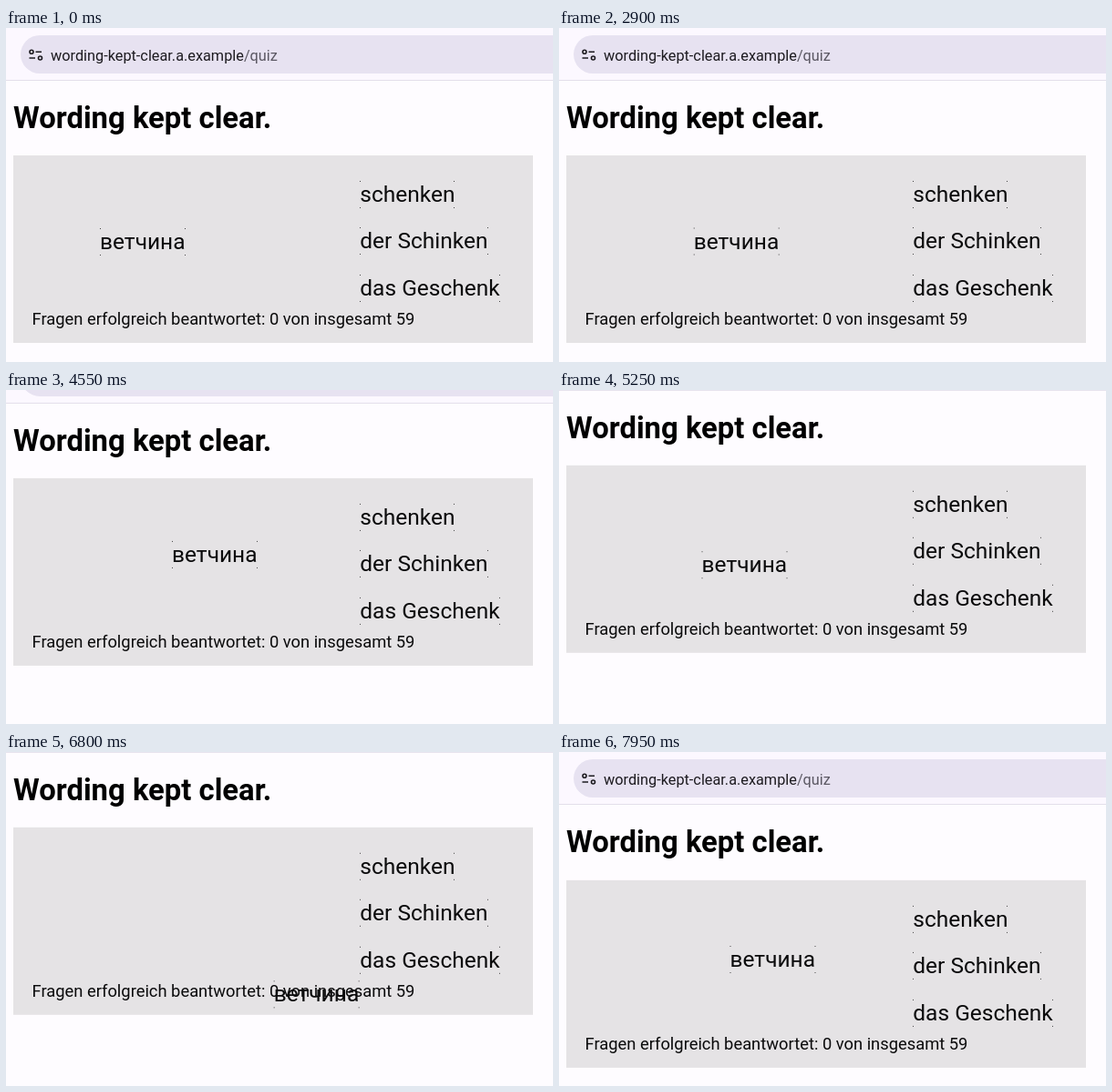
Write an HTML page that moves like this. It is 600 by 367 pixels and loops after 8000 ms.

```html
<!DOCTYPE html>
<html lang="de">
<head>
<meta charset="utf-8">
<title>Quiz</title>
<style>
  html, body { margin: 0; width: 100%; height: 100%; overflow: hidden; background: #fefcff; }
  body { position: relative; font-family: Roboto, "Noto Sans", sans-serif; color: #0b0b0c; }
  #page { position: absolute; left: 0; top: 0; width: 600px; height: 430px; }
  #page * { position: absolute; white-space: nowrap; margin: 0; }
  .bar { left: 0; top: 0; width: 600px; height: 57px; background: #fcf8ff; border-bottom: 1px solid #e3dfea; }
  .address { left: 16px; top: 8px; width: 620px; height: 42px; border-radius: 21px; background: #e7e2f1; }
  .bar svg { left: 24px; top: 22px; }
  .url { left: 49px; top: 20.5px; font-size: 16.3px; color: #1d1b20; }
  .url span { position: static !important; color: #5b5863; }
  h1 { left: 8px; top: 80px; font-size: 32.8px; font-weight: 700; color: #000; }
  #panel { left: 0; top: 0; }
  .back { left: 8px; top: 139.5px; width: 570px; height: 206.5px; background: #e5e3e5; }
  .status { left: 28.5px; top: 308.6px; font-size: 18.35px; }
  /* Each card has a single dark dot at every corner. */
  .card {
    left: 388.3px; top: calc(168px + var(--row) * 51.4px); font-size: 24.5px; padding-bottom: 1px;
    --dot: linear-gradient(#444, #444);
    background: var(--dot) 0 0, var(--dot) 100% 0, var(--dot) 0 100%, var(--dot) 100% 100%;
    background-size: 1px 1px; background-repeat: no-repeat;
  }
  #word { left: 103px; top: 219.5px; }
</style>
</head>
<body>
<div id="page">
  <div class="bar">
    <div class="address"></div>
    <svg width="18" height="16" fill="none" stroke="#1d1b20" stroke-width="1.6">
      <circle cx="4" cy="4.3" r="2"/><path d="M8.5 4.3H15M1.5 11H8"/><circle cx="13.5" cy="11" r="2"/>
    </svg>
    <div class="url">wording-kept-clear.a.example<span>/quiz</span></div>
  </div>
  <h1>Wording kept clear.</h1>
  <div id="panel">
    <div class="back"></div>
    <div class="card" style="--row:0">schenken</div>
    <div class="card" style="--row:1">der Schinken</div>
    <div class="card" style="--row:2">das Geschenk</div>
    <div class="status">Fragen erfolgreich beantwortet: 0 von insgesamt 59</div>
  </div>
  <div class="card" id="word">ветчина</div>
</div>
<script>
const LOOP = 8000, SCROLL = 57.2;
const byId = id => document.getElementById(id);
const page = byId('page'), panel = byId('panel'), word = byId('word');

const progress = (time, start, end) => Math.min(1, Math.max(0, (time - start) / (end - start)));
const ease = (...span) => { const p = progress(...span); return p * p * (3 - 2 * p); };
const bump = (...span) => Math.sin(Math.PI * progress(...span)) ** 2;
const move = (element, x, y) => element.style.transform = `translate(${x}px, ${y}px)`;

// The finger drags the word along glides, with swings out and back on top.
function dragOffset(time) {
  let x = 0, y = 0;
  const add = (amount, dx, dy) => { x += amount * dx; y += amount * dy; };
  const glide = (start, end, dx, dy) => add(ease(time, start, end), dx, dy);
  const swing = (start, end, dx, dy) => add(bump(time, start, end), dx, dy);

  glide(2200, 3650, 57.5, -8);
  swing(2200, 3000, 121, 23);
  glide(3650, 4550, 21.5, -3);
  glide(4550, 6150, -62.5, -30.5);
  swing(4700, 5600, 0, 43);
  glide(6450, 7250, 56, 23.5);
  swing(6450, 7250, 157, 125);
  glide(7450, 7950, 12, 11);
  return [x, y];
}

function draw(now) {
  const time = now % LOOP;
  const back = ease(time, 7550, 7900);
  move(page, 0, SCROLL * (back - ease(time, 4240, 4700)));
  move(panel, 0, 0.9 * back);
  move(word, ...dragOffset(time));
  requestAnimationFrame(draw);
}
draw(performance.now());
</script>
</body>
</html>
```
